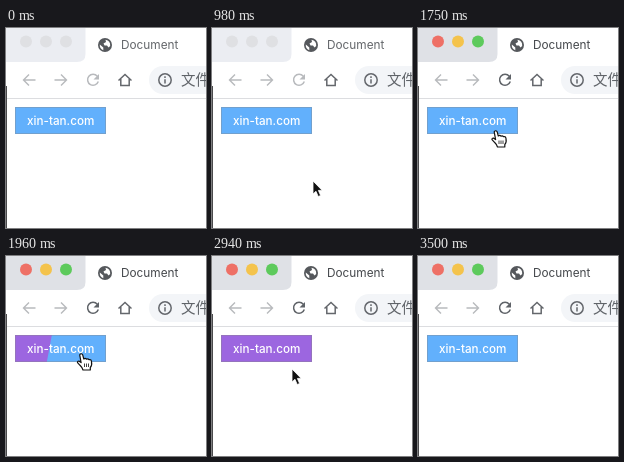
Write an HTML page that moves like this. It is 200 px wide and 200 px high and loops after 3710 ms.

```html
<!DOCTYPE html>
<html lang="en">
<head>
<meta charset="utf-8">
<title>Button hover</title>
<style>
html, body { margin: 0; width: 100%; height: 100%; overflow: hidden; background: #fff; }
svg { display: block; width: 100vw; height: 100vh; }
text { font: 11.8px Inter, Roboto, sans-serif; }
.line { fill: none; stroke: #64676c; stroke-width: 1.5; }
.off { stroke: #b8babd; stroke-width: 1.4; }
</style>
</head>
<body>
<svg viewBox="0 0 200 200">
  <defs><clipPath id="box"><rect x="9" y="79" width="91" height="27"/></clipPath></defs>

  <!-- tab strip -->
  <rect id="strip" width="200" height="34"/>
  <path d="M200 0H79.500V26Q79.500 34 71 34H200Z" fill="#fff"/>
  <g id="lights">
    <circle cx="20" cy="13.500" r="6"/>
    <circle cx="40" cy="13.500" r="6"/>
    <circle cx="60" cy="13.500" r="6"/>
  </g>
  <circle cx="99" cy="17" r="7" fill="#55585c"/>
  <path d="M93.800 16.500L97.300 19.500V22.200Q93.300 20.500 93.800 16.500ZM99.500 11.800Q104.500 12.500 104.200 18L102.500 19.500L101 17.500H98.500L97.500 15.500L100 14Z" fill="#fff"/>
  <text id="title" x="115" y="21">Document</text>

  <!-- toolbar -->
  <path class="line off" d="M29.500 52H18M23 46.500L17.500 52L23 57.500M48.500 52H60M55 46.500L60.500 52L55 57.500"/>
  <g id="reload">
    <path fill="none" stroke-width="1.500" d="M91.300 48.200A5.500 5.500 0 1 0 92.300 53.500"/>
    <path stroke="none" d="M93 46V51.500H87.500Z"/>
  </g>
  <path class="line" d="M112.500 52.500L119 46.500L125.500 52.500M114.800 51V57.500H123.200V51"/>
  <rect x="143" y="38" width="80" height="28" rx="14" fill="#f3f5f8"/>
  <circle class="line" cx="159" cy="52" r="6.200"/>
  <path class="line" d="M159 51.200V55.500M159 48.300V49.900"/>
  <text x="175" y="57" fill="#5f6368" style="font: 14.5px 'Noto Sans CJK SC', 'Noto Sans CJK', sans-serif">文件</text>
  <rect y="70" width="200" height="1" fill="#dcdde0"/>
  <rect y="58" width="1" height="142" fill="#4a4a4c"/>

  <!-- button -->
  <g clip-path="url(#box)">
    <rect x="9" y="79" width="91" height="27" fill="#62b0fc"/>
    <path id="fill" fill="#9c66e0"/>
  </g>
  <rect x="9.500" y="79.500" width="90" height="26" fill="none" stroke="#888" stroke-opacity=".4"/>
  <text x="21" y="97" fill="#fff" style="font-size: 11.7px; font-weight: 500">xin-tan.com</text>

  <!-- pointers, hot spot at 0,0 -->
  <path id="arrow" d="M0 0V13L3 10.300L5.200 15.500L7.600 14.500L5.400 9.400H9.200Z" fill="#111" stroke="#fff" stroke-width=".8"/>
  <g id="hand" stroke="#111" stroke-width="1.200" stroke-linejoin="round">
    <path d="M-1.800 .8Q-.3-1.300 1.200 .8L2.300 5Q3.600 3.600 5 5.200Q6.400 4.200 7.500 5.700Q9.500 5 10 7.500Q10.700 11.500 8.800 13.500V16H1.500Q.8 13.500-1.500 11.300L-4 8.700Q-4.200 6.800-2.300 7.200L-.4 8.600Z" fill="#fff"/>
    <path d="M3 9.500V13M5 9.500V13M7 9.500V13" stroke-width=".8"/>
  </g>
</svg>
<script>
const LOOP = 3710, STEP = 70;
const $ = id => document.getElementById(id);
const clamp = v => Math.min(1, Math.max(0, v));

// pointer route: time, x, y
const route = [
  [350, 95, 204], [490, 98, 185], [700, 101, 163], [910, 101, 153],
  [1330, 101, 153], [1400, 93, 136], [1540, 86, 120], [1750, 78, 103], [1890, 75.5, 98],
  [2520, 75.5, 98], [2590, 76, 98], [2800, 78, 104], [2940, 80, 113],
  [3080, 85, 142], [3150, 88, 160], [3290, 94, 204]
];

function pointerAt(t) {
  const i = route.findIndex(p => p[0] > t);
  if (i < 1) return [0, 300];
  const [t0, x0, y0] = route[i - 1], [t1, x1, y1] = route[i];
  const k = (t - t0) / (t1 - t0);
  return [x0 + (x1 - x0) * k, y0 + (y1 - y0) * k];
}

// CSS "ease": cubic-bezier(.25, .1, .25, 1)
function ease(x) {
  let lo = 0, hi = 1;
  for (let i = 0; i < 20; i++) {
    const s = (lo + hi) / 2, r = 1 - s;
    if (.75 * s * r * r + .75 * s * s * r + s ** 3 < x) lo = s; else hi = s;
  }
  return .3 * lo * (1 - lo) ** 2 + 3 * lo * lo * (1 - lo) + lo ** 3;
}

function draw(now) {
  const t = Math.floor(now % LOOP / STEP) * STEP;

  const focused = t >= 1050;
  const paint = (node, on, off) => node.setAttribute('fill', focused ? on : off);
  paint($('strip'), '#dfe1e6', '#ebedf2');
  paint($('title'), '#44474b', '#63666a');
  paint($('reload'), '#5f6368', '#b8babd');
  $('reload').setAttribute('stroke', $('reload').getAttribute('fill'));
  ['#ee7066', '#f4c34c', '#5dca5c'].forEach((color, i) =>
    paint($('lights').children[i], color, '#dfe0e3'));

  const part = t < 2900 ? ease(clamp((t - 1845) / 500)) : 1 - ease(clamp((t - 2990) / 500));
  const edge = 3 + part * 104;
  $('fill').setAttribute('d', `M0 79H${edge + 5}L${edge} 106H0Z`);

  const [x, y] = pointerAt(t), over = y < 106;
  for (const [id, shown] of [['arrow', !over], ['hand', over]]) {
    $(id).setAttribute('transform', `translate(${x} ${y})`);
    $(id).setAttribute('visibility', shown ? 'visible' : 'hidden');
  }
  requestAnimationFrame(() => draw(performance.now()));
}
draw(0);
</script>
</body>
</html>
```
